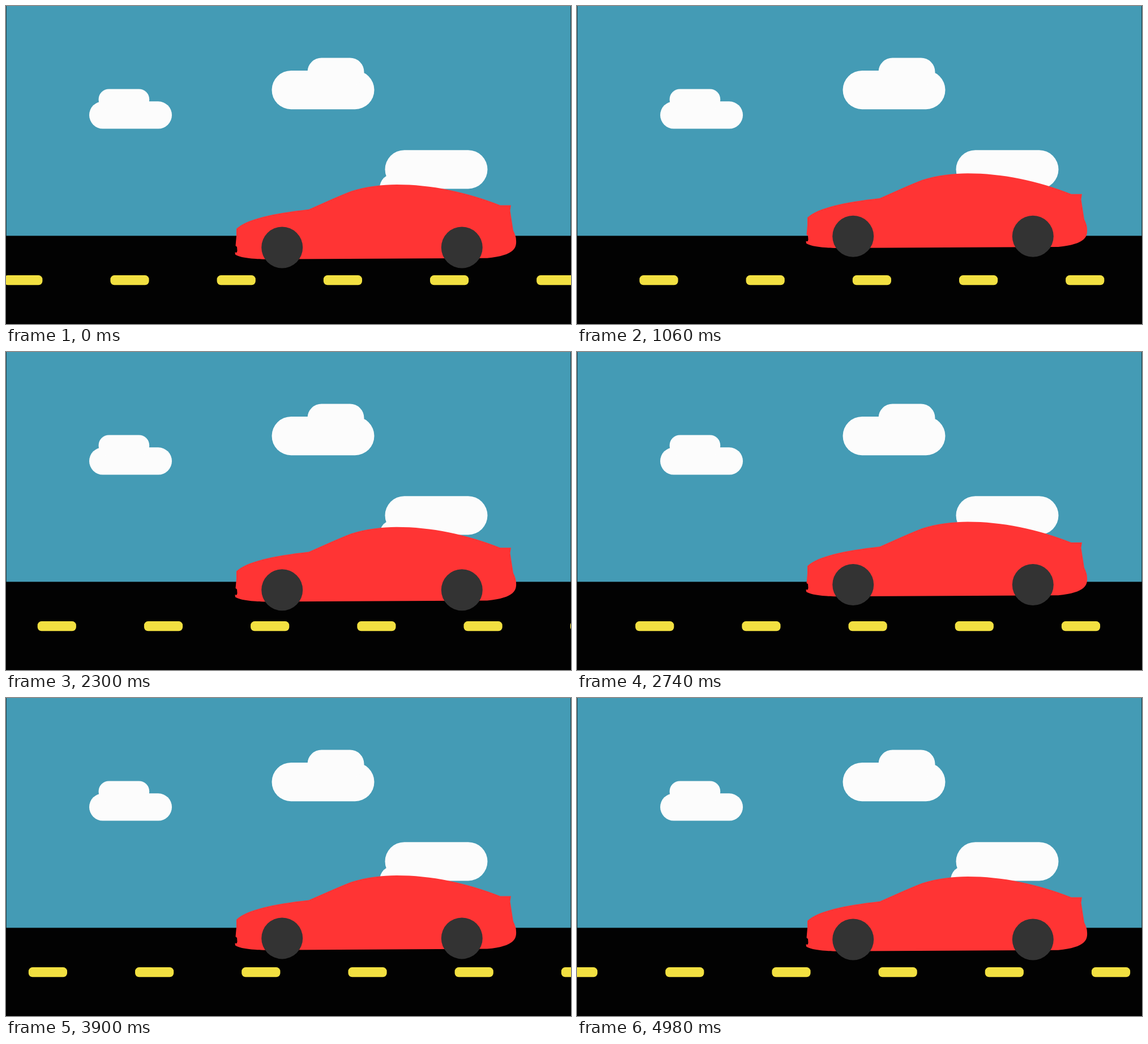
Animation, 998 px wide and 561 px high, one loop 5 s. Source, as an HTML page with a canvas:

```html
<!DOCTYPE html>
<html lang="en">
<head>
<meta charset="utf-8">
<title>Red car</title>
<style>
  html, body { margin: 0; width: 100%; height: 100%; overflow: hidden; background: #000; }
  canvas { display: block; }
</style>
</head>
<body>
<canvas id="stage" width="998" height="561"></canvas>
<script>
const ctx = document.getElementById("stage").getContext("2d");
const W = 998, H = 561;
const LOOP = 5000, STEP = 20;
const LIFT = 21, LEG = 1000, BOUNCE_END = 4000;
const DASH = { x: -3.8, y: 475.1, w: 68.2, h: 17.1, gap: 188.2, speed: 0.1077 };

// x, y, width, height, radius
const CLOUDS = [
  [147, 168.3, 146, 48.2, 24.1], [163.5, 146.4, 89.7, 37, 18.5],
  [469.5, 114, 181, 68.2, 34.1], [532.5, 91.4, 100, 50, 25],
  [669.5, 254.2, 181, 68.2, 34.1], [660, 296, 100, 50, 25]
];

const CAR = new Path2D(`
  M407 393 C425 376 470 366 535 358.7
  L575 341 Q598 331 610 326.5
  C635 318.5 665 315 690 315
  C750 315 815 328 873 351.6
  L892 351.6 L890.5 361 L896 396
  C899 402 901 408 901 413
  C902 426 899 440 850 444.7
  L455 446.8 C430 446 411 443 405 438.5
  L404.5 434.5 L407.5 435 L408.5 432 L408 425 L405.5 423 L407 406 Z`);

function box(x, y, w, h, r) {
  ctx.beginPath();
  ctx.roundRect(x, y, w, h, r);
  ctx.fill();
}

function wheel(x) {
  ctx.beginPath();
  ctx.arc(x, 426, 36.5, 0, Math.PI * 2);
  ctx.fill();
}

function drawSky() {
  ctx.fillStyle = "#020202";
  ctx.fillRect(0, 0, W, H);
  ctx.fillStyle = "#449bb5";
  ctx.fillRect(0.6, 0, W - 1.2, 405.4);
  ctx.fillStyle = "#fcfcfc";
  CLOUDS.forEach(c => box(...c));
}

function drawRoad(t) {
  ctx.fillStyle = "#f2e041";
  const first = (DASH.x + DASH.speed * t) % DASH.gap - DASH.gap;
  for (let x = first; x < W; x += DASH.gap) box(x, DASH.y, DASH.w, DASH.h, 7);
}

function drawCar(t) {
  const phase = t % (2 * LEG);
  const rise = t < BOUNCE_END ? 1 - Math.abs(phase / LEG - 1) : 0;
  ctx.save();
  ctx.translate(0, -LIFT * rise);
  ctx.fillStyle = "#ff3434";
  ctx.fill(CAR);
  ctx.fillStyle = "#333";
  wheel(487.7);
  wheel(805.3);
  ctx.restore();
}

function draw(ms) {
  const t = Math.floor((ms % LOOP) / STEP) * STEP;
  drawSky();
  drawRoad(t);
  drawCar(t);
}

const start = performance.now();
function tick(now) {
  draw(Math.max(0, now - start));
  requestAnimationFrame(tick);
}
tick(start);
</script>
</body>
</html>
```
